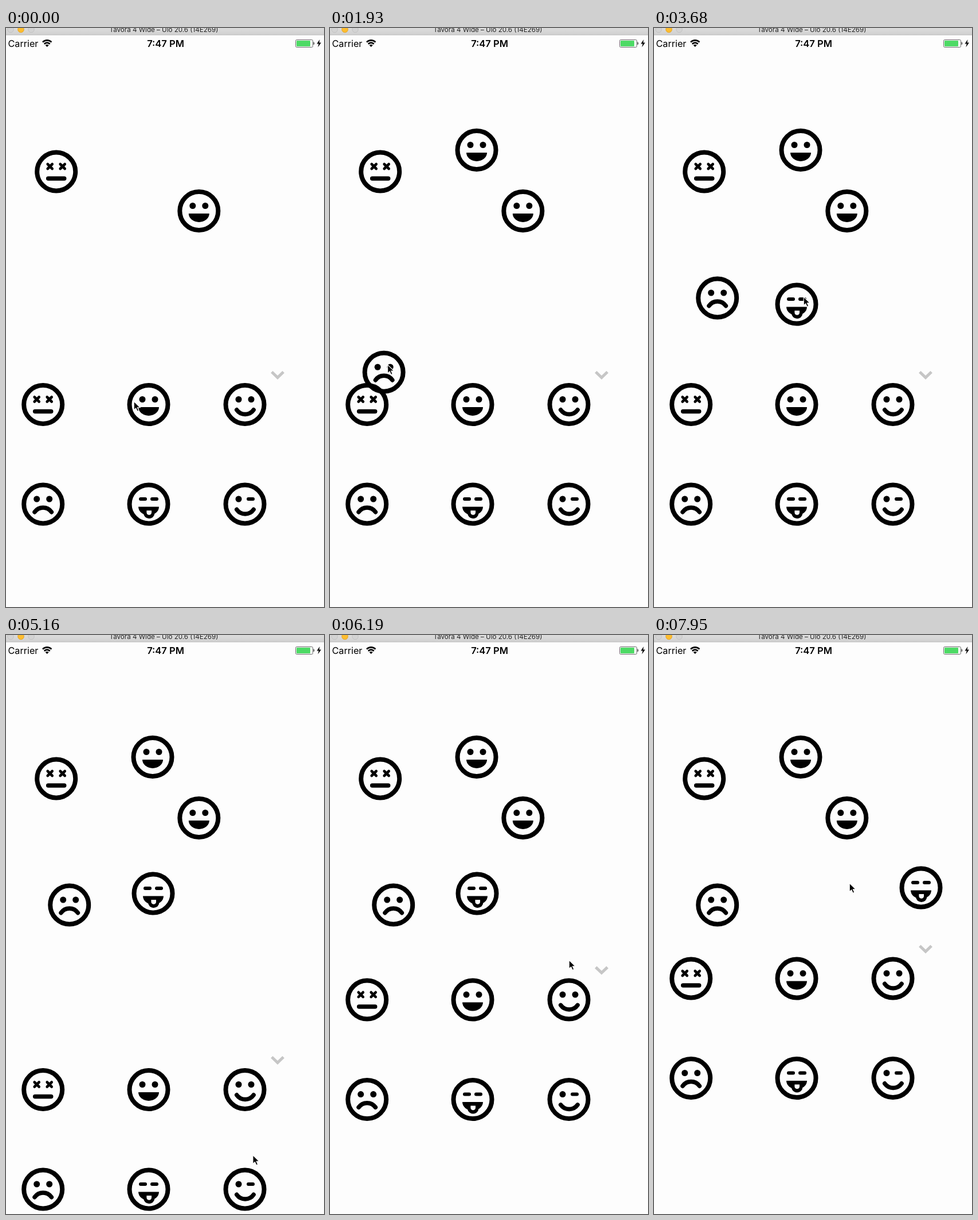
Animation of 555 by 1008 pixels, one loop 8 s. Source, as an HTML page:

```html
<!DOCTYPE html>
<html lang="en">
<head>
<meta charset="utf-8">
<title>Sticker drag</title>
<style>
  html, body { margin: 0; width: 100%; height: 100%; overflow: hidden; background: #fdfdfd; }
  svg { display: block; width: 555px; height: 1008px; }
  text { font-family: Inter, Roboto, sans-serif; }
  .line { fill: none; stroke: #000; stroke-linecap: round; }
</style>
</head>
<body>
<svg viewBox="0 0 555 1008">
  <defs>
    <linearGradient id="bar" x2="0" y2="1">
      <stop stop-color="#dcdcdc"/><stop offset="1" stop-color="#d0d0d0"/>
    </linearGradient>
    <circle id="ring" r="33.5" class="line" stroke-width="8"/>
    <circle id="dot" r="5.5"/>
    <path id="dash" d="M-4 0H4" class="line" stroke-width="6"/>
    <path id="cross" d="M-4 -4L4 4M4 -4L-4 4" class="line" stroke-width="4.6"/>
    <path id="grin" d="M-18 4.5H18A18 15 0 0 1 -18 4.5Z"/>
    <path id="curve" d="M-14.7 9.3A18 18 0 0 0 14.7 9.3" class="line" stroke-width="7.5"/>
    <g id="dead">
      <use href="#ring"/><use href="#cross" x="-11" y="-9"/><use href="#cross" x="11" y="-9"/>
      <path d="M-14 12H14" class="line" stroke-width="7.5"/>
    </g>
    <g id="eyes"><use href="#ring"/><use href="#dot" x="-11" y="-9"/><use href="#dot" x="11" y="-9"/></g>
    <g id="happy"><use href="#eyes"/><use href="#grin"/></g>
    <g id="smile"><use href="#eyes"/><use href="#curve" x=".4"/></g>
    <g id="sad"><use href="#eyes"/><use href="#curve" transform="translate(0 23) scale(1 -1)"/></g>
    <g id="tongue">
      <use href="#ring"/><use href="#dash" x="-10" y="-9"/><use href="#dash" x="10" y="-9"/>
      <use href="#grin"/>
      <path d="M-9 10V15.5A9.7 9.5 0 0 0 10.4 15.5V10Z"/>
      <path d="M-3.6 11H5V14.5A4.3 4.3 0 0 1 -3.6 14.5Z" fill="#fdfdfd"/>
    </g>
    <g id="wink">
      <use href="#ring"/><use href="#dot" x="-11" y="-9"/><use href="#dash" x="10" y="-9"/>
      <use href="#curve" x=".4"/>
    </g>
  </defs>

  <rect width="555" height="1008" fill="#fdfdfd"/>
  <rect width="555" height="12" fill="url(#bar)"/>
  <path d="M0 12H555" stroke="#b8b8b8"/>
  <g fill="#d3d3d3" stroke="#c3c3c3">
    <circle cx="8" cy="2.5" r="5.3"/>
    <circle cx="26" cy="2.5" r="5.3" fill="#fdbd2f" stroke="#e5a527"/>
    <circle cx="44" cy="2.5" r="5.3"/>
  </g>
  <text x="275.5" y="7.2" font-size="11.6" text-anchor="middle" fill="#222">Tavora 4 Wide – Ulo 20.6 (14E269)</text>

  <text x="3.5" y="32.7" font-size="16.2">Carrier</text>
  <text x="278.5" y="32.7" font-size="16.5" font-weight="600" text-anchor="middle">7:47 PM</text>
  <g fill="none" stroke="#000" stroke-width="2.6">
    <path d="M64 24.6A10.8 10.8 0 0 1 79.4 24.6M66.7 27.8A6.8 6.8 0 0 1 76.7 27.8"/>
    <path d="M71.7 33L68.7 30A4 4 0 0 1 74.7 30Z" fill="#000" stroke="none"/>
  </g>
  <rect x="505.5" y="20.5" width="30" height="13" rx="2" fill="#fff" stroke="#666"/>
  <rect x="507" y="22" width="24" height="10" rx="1" fill="#4cd964"/>
  <path d="M537 24.5Q538.8 26.7 537 29Z" stroke="#333" stroke-width=".6"/>
  <path d="M547.5 20L542.5 27.5H545.8L544.3 33.5L550 25.5H546.6Z"/>

  <use href="#dead" x="87.7" y="250"/>
  <use href="#happy" x="336.8" y="318.5"/>
  <g id="panel">
    <path d="M463.8 598.8L474 608.5L484.2 598.8" fill="none" stroke="#c6c6c6" stroke-width="5"/>
  </g>
  <g id="placed"></g>
  <path id="cursor" d="M-.8 0V15L2.7 11.8L5.2 17.3L7.8 16.2L5.4 10.8H10.2Z" stroke="#fff" stroke-width="1.1"/>
</svg>
<script>
const LOOP = 8000, TICK = 146.5; // the screen refreshes once per tick

const faces = ["dead", "happy", "smile", "sad", "tongue", "wink"];
const home = i => [[64.7, 249, 417][i % 3], i < 3 ? 655.5 : 829];

// Where the hand is by each tick, and the sticker it carries there
const hand = [
  [0, 224, 650], [4, 231, 207, "happy"], [7, 219, 618],
  [11, 72, 816], [16, 118, 457, "sad"], [18, 149, 474], [20, 337, 660],
  [23, 262, 816], [25, 262, 468, "tongue"], [26, 270, 437, "tongue"],
  [32, 467, 620], [37, 425, 960], [40, 418, 513], [42, 418, 566],
  [47, 262, 442], [52, 235, 432, "tongue"], [53, 471, 432, "tongue"], [54, 342, 432]
];
// The tray is pulled down, then flung up
const tray = [[33, 0, 0], [35, 0, 136], [37, 0, 276], [40, 0, 276], [43, 0, -57.5]];

const easeOut = p => 1 - (1 - p) ** 2;

function pointAt(path, tick) {
  const next = path.findIndex(stop => stop[0] > tick);
  if (next < 1) return (next ? path[path.length - 1] : path[0]).slice(1, 3);
  const [a, b] = [path[next - 1], path[next]];
  const p = easeOut((tick - a[0]) / (b[0] - a[0]));
  return [1, 2].map(i => a[i] + (b[i] - a[i]) * p);
}

// A sticker gathers every movement the hand makes while carrying it
function stickerAt(name, tick) {
  let [x, y] = home(faces.indexOf(name)), shown = false;
  hand.forEach(([end, , , held], i) => {
    if (held !== name || tick <= hand[i - 1][0]) return;
    const [, x0, y0] = hand[i - 1];
    const [x1, y1] = pointAt(hand, Math.min(tick, end));
    x += x1 - x0;
    y += y1 - y0;
    shown = true;
  });
  return shown && [x, y];
}

const byId = id => document.getElementById(id);

function addFace(parent, name) {
  const el = document.createElementNS("http://www.w3.org/2000/svg", "use");
  el.setAttribute("href", "#" + name);
  return byId(parent).appendChild(el);
}

function place(el, point) {
  el.style.display = point ? "" : "none";
  if (point) el.setAttribute("transform", `translate(${point})`);
}

faces.forEach((name, i) => place(addFace("panel", name), home(i)));
const stickers = ["happy", "sad", "tongue"].map(name => [name, addFace("placed", name)]);

const start = performance.now();
function draw() {
  const ms = (performance.now() - start) % LOOP;
  const tick = Math.max(0, Math.floor((ms - 8) / TICK));
  place(byId("cursor"), pointAt(hand, tick));
  place(byId("panel"), pointAt(tray, tick));
  for (const [name, el] of stickers) place(el, stickerAt(name, tick));
  requestAnimationFrame(draw);
}
draw();
</script>
</body>
</html>
```
